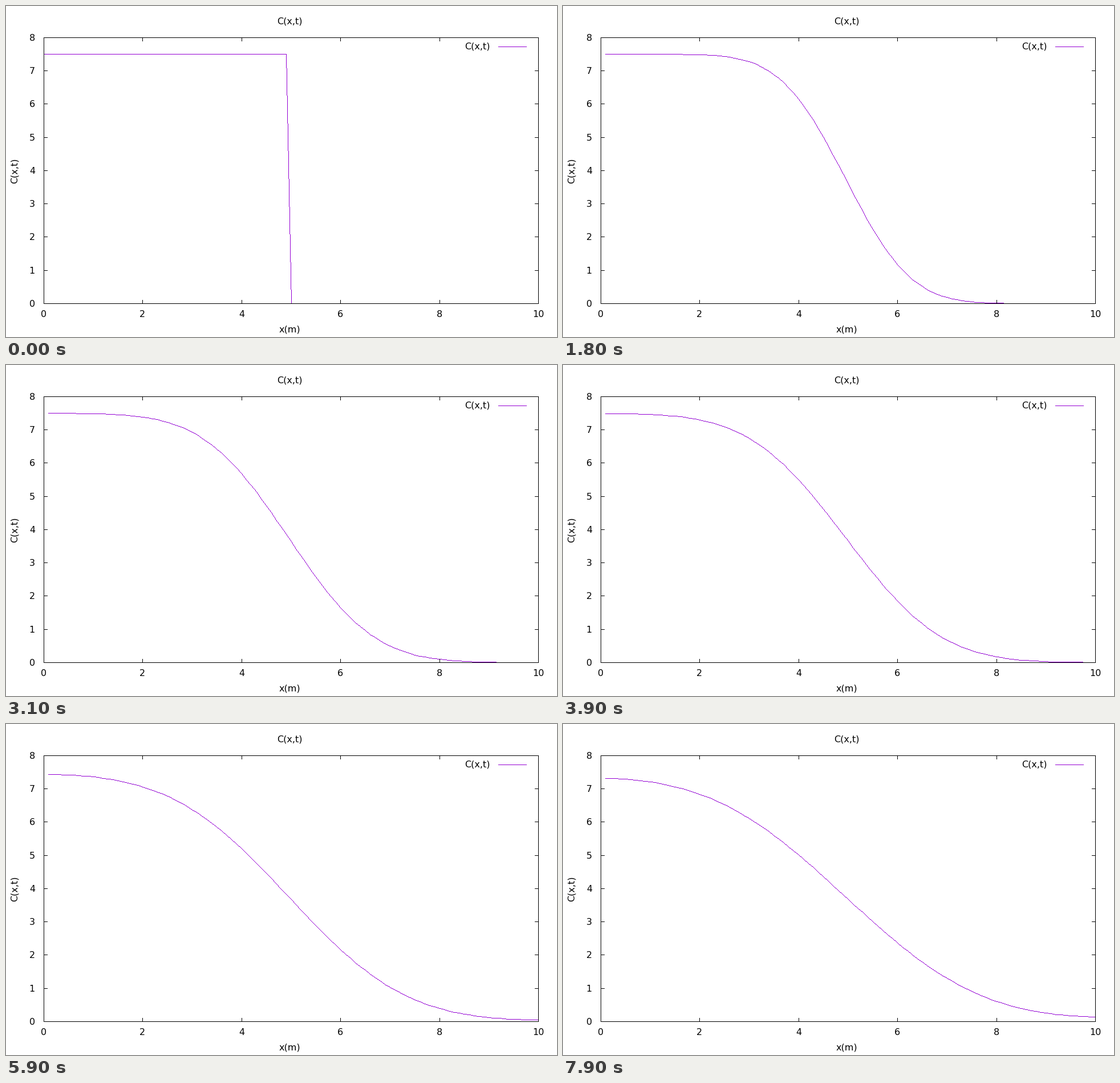
These frames come from a looping animation (966x580 px, 8 s). A matplotlib script:

```python
import numpy as np
import matplotlib.pyplot as plt
from matplotlib.animation import FuncAnimation

W, H, DPI = 966, 580, 100
LEFT, RIGHT, TOP, BOTTOM = 66, 933, 55, 521
FRAMES, INTERVAL = 80, 100
WHITE, BLACK, PURPLE = (255, 255, 255), (0, 0, 0), (148, 0, 211)

# Diffusion of a step on [0.1, 10] with closed ends
C0, DX, N = 7.5, 0.1, 100
D_FRAME = 0.03  # diffusivity times the time between frames

fig = plt.figure(figsize=(W / DPI, H / DPI), dpi=DPI, facecolor="white")
plt.rcParams["font.family"] = "DejaVu Sans"


def col(x):
    return LEFT + np.floor(np.asarray(x) * (RIGHT - LEFT) / 10 + 0.5).astype(int)


def row(c):
    return BOTTOM - np.floor(np.asarray(c) * (BOTTOM - TOP) / 8 + 0.5).astype(int)


def stroke(img, xs, ys, color):
    """Draw a one pixel wide polyline without antialiasing."""
    for x0, y0, x1, y1 in zip(xs[:-1], ys[:-1], xs[1:], ys[1:]):
        steps = max(abs(x1 - x0), abs(y1 - y0), 1)
        t = np.arange(steps + 1) / steps
        px = np.ceil(x0 + (x1 - x0) * t - 0.5).astype(int)
        py = np.ceil(y0 + (y1 - y0) * t - 0.5).astype(int)
        img[py, px] = color


def draw_axes(img):
    stroke(img, [LEFT, RIGHT, RIGHT, LEFT, LEFT],
           [TOP, TOP, BOTTOM, BOTTOM, TOP], BLACK)
    for v in range(1, 8):
        y = int(row(v))
        stroke(img, [LEFT, LEFT + 6], [y, y], BLACK)
        stroke(img, [RIGHT - 6, RIGHT], [y, y], BLACK)
    for v in range(2, 10, 2):
        x = int(col(v))
        stroke(img, [x, x], [TOP, TOP + 6], BLACK)
        stroke(img, [x, x], [BOTTOM - 6, BOTTOM], BLACK)


# Cosine modes of the discrete Laplacian with mirrored ends
k = np.arange(N)
modes = np.cos(np.pi * np.outer(k, k + 0.5) / N)
rates = 4 * np.sin(np.pi * k / (2 * N)) ** 2 / DX ** 2
start = np.where(k < 49, C0, 0.0)
weights = modes @ start * np.where(k == 0, 1, 2) / N


def profile(n):
    if n == 0:
        i = np.arange(N + 1)
        return i * DX, np.where(i < 50, C0, 0.0)
    c = (weights * np.exp(-rates * D_FRAME * n)) @ modes
    return (k + 1) * DX, np.clip(c, 0, C0)


def render(n):
    img = np.full((H, W, 3), WHITE, dtype=np.uint8)
    x, c = profile(n)
    xs = col(x)
    xs[0] = LEFT + int(x[0] * (RIGHT - LEFT) / 10)  # the cap reaches back
    stroke(img, xs, row(c), PURPLE)
    stroke(img, [863, 912], [71, 71], PURPLE)
    draw_axes(img)
    return img


def label(x, baseline, s, ha="center", **kw):
    fig.text(x / W, 1 - baseline / H, s, ha=ha, va="baseline",
             fontsize=16 * 72 / DPI, color="black", **kw)


label(497, 32, "C(x,t)")
label(497, 571, "x(m)")
label(849, 76, "C(x,t)", "right")
label(20, 289, "C(x,t)", rotation=90, rotation_mode="anchor")
for v in range(9):
    label(51, int(row(v)) + 6, str(v), "right")
for v in range(0, 11, 2):
    label(int(col(v)), 545, str(v))

plot = fig.figimage(render(0), origin="upper", zorder=-1)


def update(n):
    plot.set_data(render(n))
    return [plot]


anim = FuncAnimation(fig, update, frames=FRAMES, interval=INTERVAL,
                     repeat=True, repeat_delay=0, blit=False)
plt.show()
```
